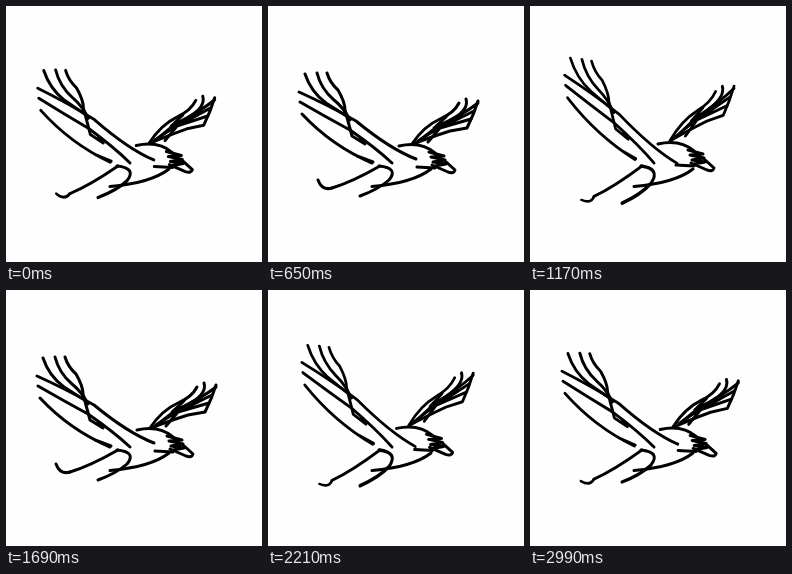
These frames come from a looping animation (256x256 px, 3120 ms). An HTML page without scripts:

```html
<!DOCTYPE html>
<html lang="en">
<head>
<meta charset="utf-8">
<title>Flying bird</title>
<style>
@property --flap { syntax: "<number>"; inherits: true; initial-value: 0; }
@property --power { syntax: "<number>"; inherits: true; initial-value: 1; }

html, body { margin: 0; width: 100%; height: 100%; overflow: hidden; background: #fefefe; }

/* Three wingbeats per loop, the last one weaker. Wings are down at lift 0, up at 1. */
svg {
  display: block; width: 100%; height: 100%;
  animation: flap 1040ms steps(2) infinite, power 3120ms steps(1) infinite;
  --lift: calc(var(--flap) * var(--power));
  --drop: min(1, 3 * var(--lift));
}
@keyframes flap {
  0% { --flap: .22; animation-timing-function: steps(1); }
  12.49% { --flap: 1; }
  37.49%, 62.49% { --flap: 0; }
  87.49% { --flap: .35; animation-timing-function: steps(1); }
  100% { --flap: .22; }
}
@keyframes power {
  0%, 100% { --power: 1; }
  66.66% { --power: .8; }
}

path { fill: none; stroke: #000; stroke-width: 3; stroke-linecap: round; stroke-linejoin: round; }

#near-wing {
  transform-origin: 124px 156px;
  transform: skewY(calc(10.6deg * var(--lift))) scaleX(calc(1 - .04 * var(--lift)));
}
#far-wing {
  transform-origin: 142px 138px;
  transform: translate(calc(-4px * var(--lift)), calc(-3px * var(--lift)))
    skewY(calc(-10deg * var(--lift))) scaleX(calc(1 - .03 * var(--lift)));
}
#head { transform: translate(calc(-3px * var(--lift)), calc(-2px * var(--lift))); }
#tail {
  transform-origin: 111px 160px;
  transform: scaleY(calc(1 + .24 * var(--lift)));
}
#leg {
  transform-origin: 112px 161px;
  transform: skewY(calc(-10deg * var(--drop)));
}
#foot {
  transform-origin: 64px 182px;
  transform: rotate(calc(-45deg * var(--drop))) scaleX(calc(1 - .3 * var(--drop)));
}
</style>
</head>
<body>
<svg viewBox="0 0 256 256">
  <g id="far-wing">
    <path d="M144 138Q156 120 172 113Q186 107 191 97M198 93Q201 103 186 112L150 135"/>
    <path d="M210 95Q206 108 199 122L182 125Q160 132 145 138"/>
    <path d="M210 97Q196 108 170 120L152 134M206 105L160 128M203 113L172 122L160 136M178 111L166 122"/>
  </g>
  <path id="tail" d="M111 160Q131 162 121 174Q111 183 92 190"/>
  <g id="leg">
    <path d="M112 160Q84 176 64 182"/>
    <path id="foot" d="M64 182Q54 185 50 174"/>
  </g>
  <path d="M104 180.500Q145 177 163 163"/>
  <g id="head">
    <path d="M131 140Q153 135 167 147M149 161L167 162"/>
    <path d="M161 146l15 4l-13 1l14 3l-12 2l13 2l-11 2M176 154L187 164Q186 168 180 166L164 159"/>
  </g>
  <g id="near-wing">
    <path d="M37 68Q43 86 58 97L80 111M49 67Q53 83 66 94Q76 102 82 114"/>
    <path d="M59 67Q62 77 70 84Q77 96 77 104L84 130L97 138L92 133"/>
    <path d="M31 86Q62 100 88 115Q122 143 148 153M32 96Q58 111 82 124Q108 142 124 157"/>
    <path d="M34 108Q64 140 104 157M89 150L105 156"/>
  </g>
</svg>
</body>
</html>
```
